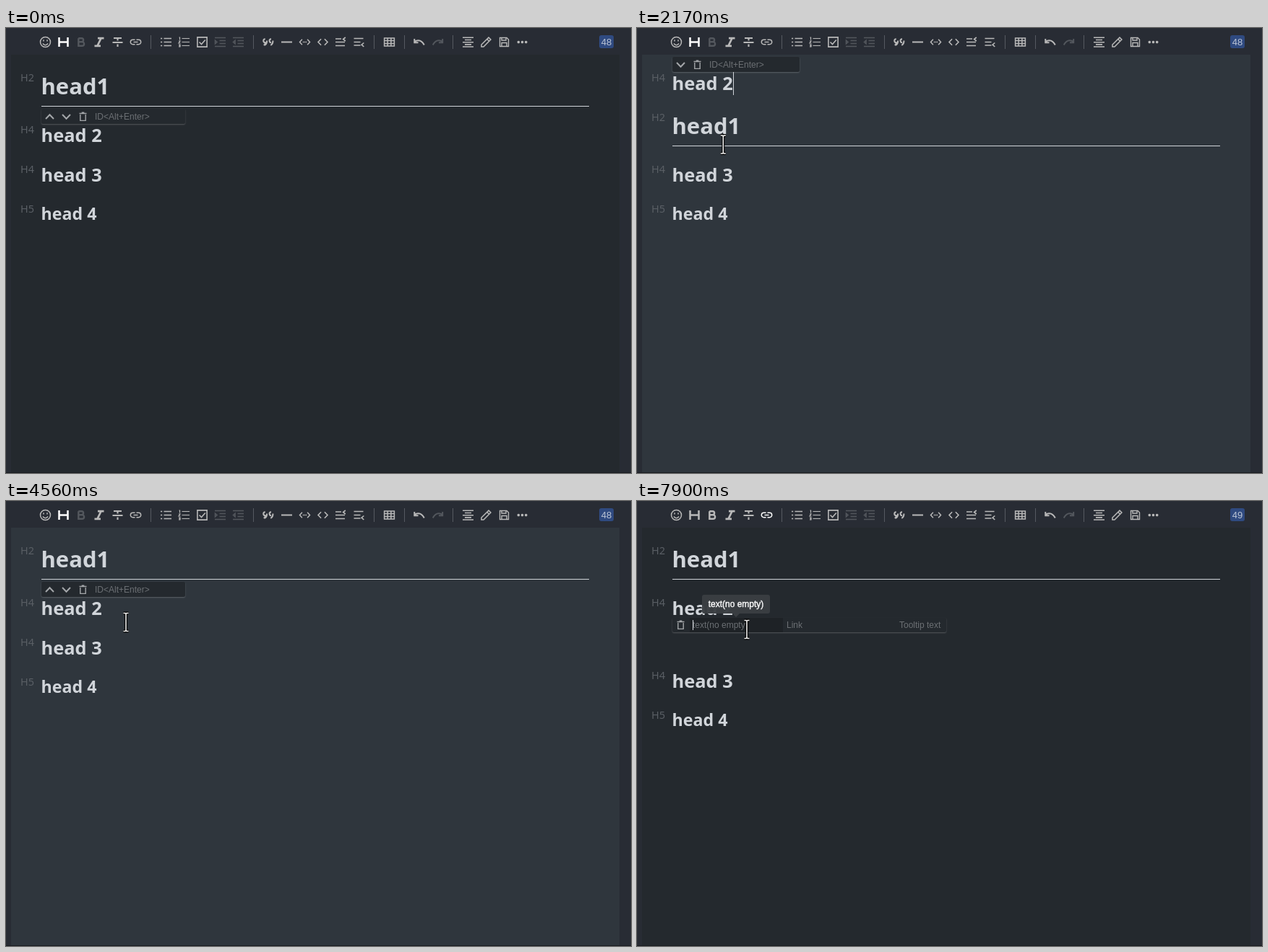
Write an HTML page with a canvas that moves like this. It is 865x617 px and loops after 8000 ms.

```html
<!DOCTYPE html>
<html lang="en">
<head>
<meta charset="utf-8">
<title>Markdown editor</title>
<style>
html, body { margin: 0; width: 100%; height: 100%; overflow: hidden; background: #282c34; }
canvas { display: block; }
</style>
</head>
<body>
<canvas id="stage" width="865" height="617"></canvas>
<script>
const ctx = document.getElementById('stage').getContext('2d');
const LOOP = 8000;
const SANS = '"Liberation Sans", Arial, sans-serif';
const HEAD = '"Noto Sans", "Open Sans", sans-serif';
const ICON = '#b9b9b9', DIM = '#53575d', DARK = '#24292e', LIGHT = '#2f363d';

// moments at which the page changes
const UP = 1700, DOWN = 3330, ENTER = 5110, BLUR = 5490, LINK = 6590, FORM = 6820;

const within = (t, a, b) => t >= a && t < b;
const clamp = v => Math.max(0, Math.min(1, v));

function rect(x, y, w, h, color) {
  ctx.fillStyle = color;
  ctx.fillRect(x, y, w, h);
}

function text(s, x, y, font, color) {
  ctx.font = font;
  ctx.fillStyle = color;
  ctx.fillText(s, x, y);
}

function shape(d, x, y, color, width) {
  ctx.save();
  ctx.translate(x, y);
  const p = new Path2D(d);
  if (width) {
    ctx.strokeStyle = color;
    ctx.lineWidth = width;
    ctx.stroke(p);
  } else {
    ctx.fillStyle = color;
    ctx.fill(p);
  }
  ctx.restore();
}

// name: [path, line width (0 = filled), x]
const icons = {
  emoji: ['M7 0A7 7 0 1 1-7 0A7 7 0 1 1 7 0M-3.6 2Q0 6.4 3.6 2M-2.5-3.3V-1M2.5-3.3V-1', 1.5, 54.5],
  head: ['M-6-6.5V6.5M6-6.5V6.5M-6 0H6', 2.5, 79.5],
  bold: ['M-3.7-5.3H.6a2.5 2.5 0 0 1 0 5H-3.7M-3.7-.3H1.3a2.8 2.8 0 0 1 0 5.6H-3.7V-5.3', 2.4, 104],
  italic: ['M-2-5.4H6.5M-6.5 5.4H2M2.6-5.4L-2.6 5.4', 2.6, 129],
  strike: ['M-5.5-5.5H5.5M0-5.5V-2M0 3V6.5M-7 .5H7', 2.1, 154.5],
  link: ['M-1-3.2H-4a3.2 3.2 0 0 0 0 6.4H-1M1-3.2H4a3.2 3.2 0 0 1 0 6.4H1M-3 0H3', 1.5, 179.5],
  list: ['M-7.5-5H-5.3M-7.5 0H-5.3M-7.5 5H-5.3M-3-5H7.5M-3 0H7.5M-3 5H7.5', 1.6, 221.5],
  ordered: ['M-3-5H7.5M-3 0H7.5M-3 5H7.5M-7-6.5H-6V-3M-7.5-1.5H-5.5L-7.5 1.5H-5M-7.5 3.6H-5.5V6.4H-7.5M-7 5H-5.5', 1.2, 246.5],
  check: ['M-6.6-6.6H6.6V6.6H-6.6ZM-4 0L-1 3L4.3-3', 1.6, 271.5],
  indent: ['M-7.5-6H7.5M-1-2H7.5M-1 2H7.5M-7.5 6H7.5M-7-2.2L-4.5 0L-7 2.2Z', 1.6, 296.5],
  outdent: ['M-7.5-6H7.5M-1-2H7.5M-1 2H7.5M-7.5 6H7.5M-4.5-2.2L-7 0L-4.5 2.2Z', 1.6, 321.5],
  quote: ['M-4.3-4.3a2.5 2.5 0 1 0 .1 5a5 5 0 0 1-2 3.8M-1.9-2Q-1.7 2.5-5 4.5M4-4.3a2.5 2.5 0 1 0 .1 5M6.4-2Q6.6 2.5 3.3 4.5', 2, 363],
  rule: ['M-7.5 0H7.5', 2, 388.5],
  code: ['M-3.6-3.8L-7 0L-3.6 3.8M3.6-3.8L7 0L3.6 3.8M-2.7 0H-1.3M-.7 0H.7M1.3 0H2.7', 1.5, 413.5],
  inline: ['M-2.4-4.3L-6.5 0L-2.4 4.3M2.4-4.3L6.5 0L2.4 4.3', 1.6, 438.5],
  before: ['M-7-4.5H1M-7 0H6M-7 5H6M6.8-6.5L3.6-4L6.8-1.5', 1.6, 463],
  after: ['M-7-5H6M-7 0H2M-7 4.5H2M6.8 1L3.6 3.7L6.8 6.5', 1.6, 488.5],
  table: ['M-6.9-5.6H6.9V5.6H-6.9ZM-7-2H7M-7 2H7M-2.4-6V6M2.4-6V6', 1.5, 530.5],
  undo: ['M-5.8-1Q2-5 6.8 4M-6.7-4.5V.7H-1.5', 2, 572],
  redo: ['M5.8-1Q-2-5-6.8 4M6.7-4.5V.7H1.5', 2, 597.5],
  align: ['M-7.5-6.3H7.5M-4.5-3H4.5M-7.5 .2H7.5M-4.5 3.4H4.5M-7.5 6.5H7.5', 1.6, 639.5],
  pencil: ['M-6.5 6.5V3.5L3.5-6.4L6.4-3.5L-3.5 6.5ZM1.2-4.2L4.2-1.2', 1.5, 664.5],
  save: ['M-6-6H3.5L6-3.5V6H-6ZM-3.5-6V-2.5H2.5V-6M-3.5 6V1H3.5V6', 1.4, 689.5],
  more: ['M-5.2-1.8a1.8 1.8 0 1 0 .01 0M0-1.8a1.8 1.8 0 1 0 .01 0M5.2-1.8a1.8 1.8 0 1 0 .01 0', 0, 714.5]
};

const CHEVRON_UP = 'M-5.5 3L0-2.7L5.5 3';
const CHEVRON_DOWN = 'M-5.5-3L0 2.7L5.5-3';
const TRASH = 'M-5-4.5H5M-1.8-5.7H1.8M-3.7-3V5.4H3.7V-3';
const HAND = 'M-2 2a2.2 2.2 0 0 1 4.4 0V11q2-1.6 4 .6q2.2-1.2 3.6 1q3-.6 3 2.4V22q0 3-2 5V31H-3V28' +
  'L-9 20q-2.4-4 .6-4.4q2 0 4 2.4L-2 20Z';
const BEAM = 'M-3.5-12.5H-1L0-11.5L1-12.5H3.5M0-11.5V11.5M-3.5 12.5H-1L0 11.5L1 12.5H3.5';

// pointer route: time, x, y
const route = [
  [220, 600, 316], [420, 330, 200], [600, 110, 124], [750, 78, 135], [919, 78, 135],
  [920, 75, 136], [1060, 75, 136], [1220, 68, 126], [2000, 68, 126],
  [2250, 143, 178], [2450, 115, 120], [2650, 67, 49], [2780, 66, 47], [3240, 66, 47],
  [3450, 108, 120], [3720, 172, 198], [3930, 166, 167], [4099, 165, 168], [4100, 166, 168], [5800, 166, 168],
  [5820, 164, 165], [6150, 172, 95], [6420, 180, 19], [6800, 180, 20],
  [6900, 189, 73], [7120, 172, 145], [7350, 150, 187], [7590, 152, 178], [LOOP, 152, 178]
];
const handTimes = [[1090, 2010], [2560, 3340], [6330, 6850]];

function pointer(t) {
  const i = route.findIndex(k => k[0] > t);
  const a = route[i - 1], b = route[i];
  const k = (t - a[0]) / (b[0] - a[0]);
  return [a[1] + (b[1] - a[1]) * k, a[2] + (b[2] - a[2]) * k];
}

function drawPointer(t) {
  if (t < route[0][0]) return;
  const [x, y] = pointer(t);
  if (handTimes.some(h => within(t, ...h))) {
    shape(HAND, x, y, '#dededb');
    shape(HAND + 'M2.4 11V17M6.4 12V17M10 13V17', x, y, '#111', 1.3);
  } else {
    shape(BEAM, x, y, '#000', 4);
    shape(BEAM, x, y, '#f2f2f2', 1.6);
  }
}

// presses: start, end, x, y
const presses = [[1540, UP, 67, 126], [3010, DOWN, 65, 45], [LINK - 20, 6670, 180, 20]];

function drawPress(t) {
  for (const [a, b, x, y] of presses) {
    if (!within(t, a, b)) continue;
    ctx.fillStyle = 'rgba(255,245,20,.6)';
    ctx.beginPath();
    ctx.arc(x, y, 21, 0, 7);
    ctx.fill();
  }
}

// carets: on, off, x, y, height
const carets = [
  [UP, 2230, 133, 61, 32], [2760, 3010, 133, 61, 32],
  [DOWN, 3860, 133, 133, 32], [4030, 4560, 133, 133, 32],
  [ENTER, 5660, 49, 182, 26], [6190, LINK, 49, 182, 26],
  [FORM, 7350, 77, 165, 14], [7900, LOOP, 77, 165, 14]
];

function drawCaret(t) {
  for (const [a, b, x, y, h] of carets) if (within(t, a, b)) rect(x, y, 1, h, '#d1d5da');
}

// hints: fade start, shown, gone, x, y, width, font size, arrow side, label
const hints = [
  [1100, 1390, UP, 9, 81, 104, 11, 1, 'Up<Ctrl+Shift+U>'],
  [2600, 2800, DOWN, 2, 9, 118, 11, 1, 'Down<Ctrl+Shift+D>'],
  [6380, 6570, 6670, 139.5, 33, 80, 11, -1, 'Link<Ctrl+K>'],
  [7420, 7670, LOOP, 90, 130, 94, 12, 1, 'text(no empty)']
];

function drawHints(t) {
  for (const [a, b, end, x, y, w, size, side, label] of hints) {
    if (!within(t, a, end)) continue;
    ctx.save();
    ctx.globalAlpha = clamp((t - a) / (b - a)) * .97;
    ctx.fillStyle = '#3a3e43';
    ctx.beginPath();
    ctx.roundRect(x, y, w, 26, 3);
    const mid = x + w / 2, edge = side > 0 ? y + 26 : y;
    ctx.moveTo(mid - 5, edge);
    ctx.lineTo(mid, edge + 5 * side);
    ctx.lineTo(mid + 5, edge);
    ctx.fill();
    ctx.textAlign = 'center';
    text(label, mid, y + 17, size + 'px ' + SANS, '#fff');
    ctx.strokeStyle = '#fff';
    ctx.lineWidth = .4;
    ctx.strokeText(label, mid, y + 17);
    ctx.restore();
  }
}

function drawToolbar(t) {
  for (const x of [200, 342, 509, 551, 618]) rect(x, 10, 1, 19, '#565a61');
  for (const name in icons) {
    const [d, width, x] = icons[name];
    let color = ICON;
    if (/dent|redo/.test(name) || (name === 'bold' && t < BLUR)) color = DIM;
    if ((name === 'head' && t < BLUR) || (name === 'link' && t >= 6350)) color = '#fff';
    shape(d, x, 19.5, color, width);
  }
  ctx.fillStyle = '#2f4a80';
  ctx.beginPath();
  ctx.roundRect(821, 10, 20, 18, 3);
  ctx.fill();
  text(t < LINK ? '48' : '49', 823.8, 24, '13px ' + SANS, '#bdc6d6');
}

function heading(tag, label, y, size, lift) {
  text(tag, 20, y - lift, '14.4px ' + HEAD, '#5a5f65');
  text(label, 48.5, y, `bold ${size}px ${HEAD}`, '#d1d5da');
}

function drawHeadings(t) {
  const swapped = within(t, UP, DOWN), gap = t >= ENTER ? 46 : 0;
  const first = swapped ? 147 : 92;
  heading('H2', 'head1', first, 31, 18);
  rect(49, first + 16, 758, 1, '#d1d5da');
  heading('H4', 'head 2', swapped ? 86 : 158, 25.4, 12);
  heading('H4', 'head 3', 213 + gap, 25.4, 12);
  heading('H5', 'head 4', 266 + gap, 23.2, 10);
}

function panel(y, w, h) {
  ctx.save();
  ctx.shadowColor = 'rgba(255,255,255,.22)';
  ctx.shadowBlur = 2;
  ctx.shadowOffsetY = 1;
  ctx.fillStyle = DARK;
  ctx.beginPath();
  ctx.roundRect(49, y, w, h, 2);
  ctx.fill();
  ctx.restore();
}

function drawPopover(t) {
  const font = '12px ' + SANS, faint = '#6c7074', tone = '#a3a6a9';
  if (t < BLUR) {
    const swapped = within(t, UP, DOWN), y = swapped ? 40 : 112, shift = swapped ? -23 : 0;
    panel(y, 199 + shift, 21);
    if (!swapped) shape(CHEVRON_UP, 60.5, y + 11, within(t, 1090, UP) ? '#fff' : tone, 2);
    shape(CHEVRON_DOWN, 83.5 + shift, y + 11, within(t, 2600, DOWN) ? '#fff' : tone, 2);
    shape(TRASH, 106.5 + shift, y + 11, tone, 1.4);
    text('ID<Alt+Enter>', 123 + shift, y + 15, font, faint);
  } else if (t >= FORM) {
    panel(162, 379, 20);
    rect(73, 162, 129, 20, '#1e2226');
    shape(TRASH, 60.5, 172, tone, 1.4);
    text('text(no empty)', 77, 176, font, faint);
    text('Link', 207, 176, font, faint);
    text('Tooltip text', 363, 176, font, faint);
  }
}

function draw(t) {
  const focused = within(t, UP, 3010) || within(t, DOWN, FORM);
  rect(0, 0, 865, 617, '#282c34');
  rect(7, 37, 842, 579, focused ? LIGHT : DARK);
  rect(0, 616, 865, 1, '#191c20');
  drawToolbar(t);
  drawHeadings(t);
  drawPopover(t);
  drawCaret(t);
  drawHints(t);
  drawPress(t);
  drawPointer(t);
}

const start = performance.now();
function tick() {
  draw((performance.now() - start) % LOOP);
  requestAnimationFrame(tick);
}
tick();
</script>
</body>
</html>
```
